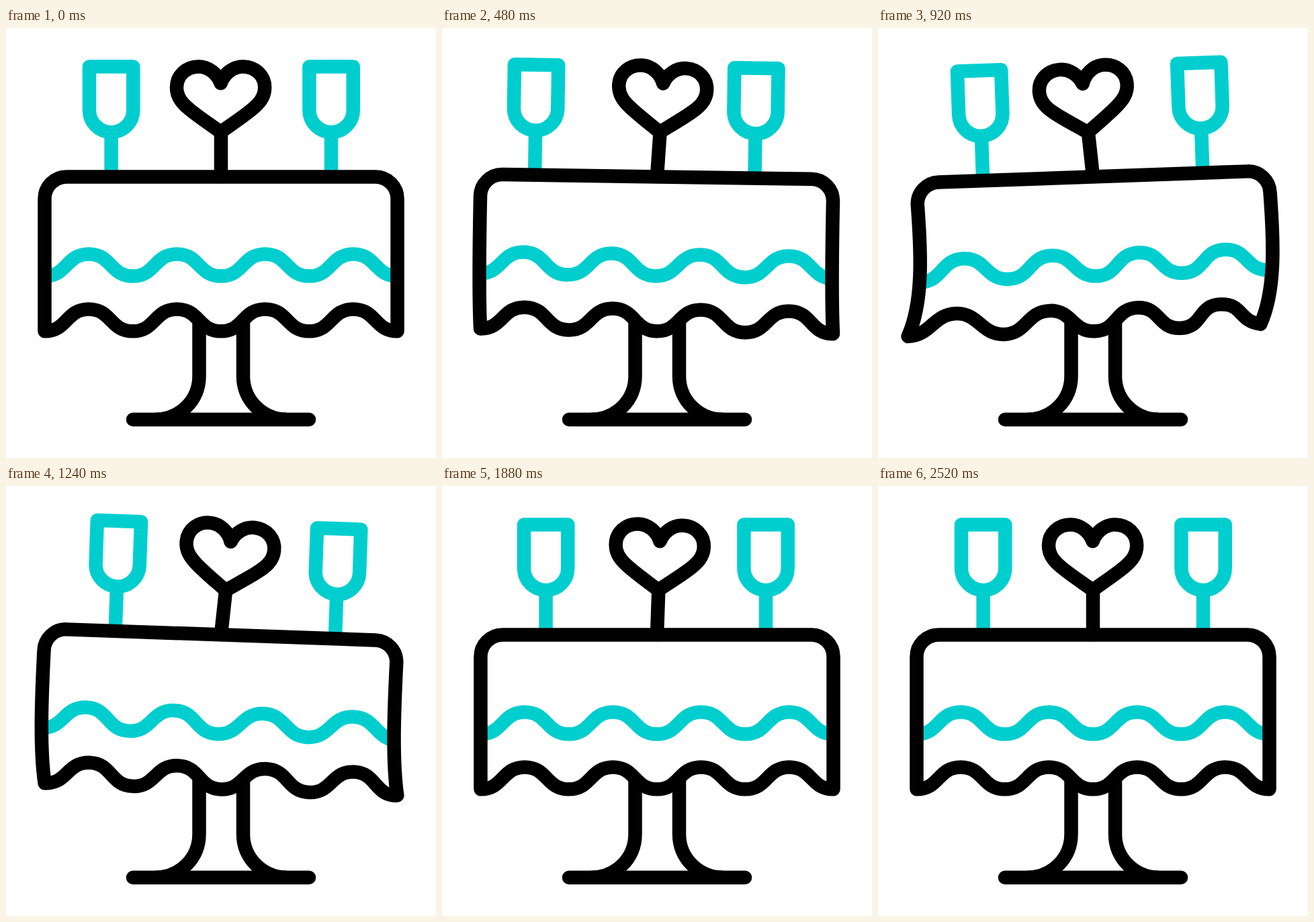
Write an HTML page that moves like this. It is 640 px wide and 640 px high and loops after 2.72 s.

```html
<!DOCTYPE html>
<html lang="en">
<head>
<meta charset="utf-8">
<title>Swaying table</title>
<style>
  html, body { margin: 0; width: 100%; height: 100%; overflow: hidden; background: #fff; }
  svg { display: block; width: 100vw; height: 100vh; }
  path { fill: none; stroke: #000; stroke-width: 20.5; stroke-linejoin: round; }
  .teal { stroke: #00cece; }
  .cap { stroke-linecap: round; }
</style>
</head>
<body>
<svg viewBox="0 0 640 640">
  <path class="cap" d="M189 582.7H451"/>
  <path d="M287.5 436V518C287.5 554 259 582.7 222 582.7M353 436V518C353 554 382 582.7 418 582.7"/>
  <g id="table">
    <path class="teal" id="trim"/>
    <g id="glasses">
      <path class="teal" id="glass" d="M124 57.5H189.3V122.5A32.65 32.65 0 0 1 124 122.5ZM156.6 157V218"/>
      <use href="#glass" x="327.4"/>
    </g>
    <path id="cloth"/>
  </g>
  <g id="heart">
    <path class="cap" id="half" d="M319.5 82C314.5 68 301.5 57.5 286.5 57.5C268 57.5 254 71 254 88.5C254 104 264 113.5 273 121C288 133.5 309 147 319.5 155"/>
    <use href="#half" transform="translate(639.2 0) scale(-1 1)"/>
    <path class="cap" d="M320 155V221"/>
  </g>
</svg>
<script>
const LOOP = 2720, STEP = 40, END = 2520;
const LEFT = 57.5, RIGHT = 582.5, TOP = 221.4;
const el = id => document.getElementById(id);

// Each swing turns on the beat: 280 ms, then every 320 ms
const swing = (...values) => [[0, 0], ...values.map((v, i) => [280 + 320 * i, v])];

const tilt = swing(-3.5, 2.85, -2, 2, -1, 0);
const sway = swing(-10, 10.4, -6.2, 6.2, -3.1, 2, -1.1, 0);
const drag = swing(-1, 1, -1, 1, -0.75, 0);
const slide = [[0, 0], [480, -18.5], [920, -0.5], [1240, 6], [1560, 0], [1880, -2], [2200, 0]];

// Smooth curve through the keys, flat at every turning point
function sample(keys, t) {
  const last = keys.length - 1;
  if (t >= keys[last][0]) return keys[last][1];
  const i = keys.findIndex(k => k[0] > t) - 1;
  const rate = j => (keys[j + 1][1] - keys[j][1]) / (keys[j + 1][0] - keys[j][0]);
  const slope = j => {
    if (j === 0 || j === last) return 0;
    const a = rate(j - 1), b = rate(j);
    return a * b > 0 ? 2 * a * b / (a + b) : 0;
  };
  const [t0, v0] = keys[i], [t1, v1] = keys[i + 1];
  const d = t1 - t0, u = (t - t0) / d;
  return v0 + (v1 - v0) * u * u * (3 - 2 * u)
    + d * u * (1 - u) * ((1 - u) * slope(i) - u * slope(i + 1));
}

// Nine alternating troughs and crests; u runs from -1 to 1 across the cloth
function wavePoints(trough, offset) {
  return Array.from({ length: 9 }, (_, i) => {
    const u = i / 4 - 1, [dx, dy] = offset(u);
    return [320 + (RIGHT - 320) * u + dx, trough - (i % 2) * 32.8 + dy];
  });
}

function waveCurve(pts, endDip = 0) {
  const H = 34;
  let d = "M" + pts[0];
  for (let i = 1; i < pts.length; i++) {
    const [x0, y0] = pts[i - 1], [x1, y1] = pts[i];
    const dip = i === pts.length - 1 ? endDip : 0;
    d += `C${x0 + H} ${y0} ${x1 - H} ${y1 + dip} ${x1} ${y1}`;
  }
  return d;
}

function draw(t) {
  // The cloth trails the table; swinging left also flares its ends
  const pull = sample(drag, t), flare = Math.min(pull, 0);
  const trim = wavePoints(369.3, u => [6 * pull * Math.max(u, 0), 0]);
  const hem = wavePoints(451.3, u => [8 * pull + flare * (16 * u * u - 3), 2 * flare * u ** 4]);
  const endShift = hem[8][0] - RIGHT;
  const bulgeL = LEFT - 0.15 * (hem[0][0] - LEFT);
  const bulgeR = RIGHT - 0.15 * endShift;

  el("trim").setAttribute("d", waveCurve(trim));
  el("cloth").setAttribute("d", waveCurve(hem, 0.3 * endShift)
    + `C${bulgeR} 400 ${bulgeR} 330 ${RIGHT} 254`
    + `C${RIGHT} 236 568 ${TOP} 550 ${TOP}H90C72 ${TOP} ${LEFT} 236 ${LEFT} 254`
    + `C${bulgeL} 330 ${bulgeL} 400 ${hem[0]}Z`);

  el("table").setAttribute("transform", `rotate(${sample(tilt, t)} 320 221)`);
  el("heart").setAttribute("transform", `rotate(${sample(sway, t)} 320 221)`);
  el("glasses").setAttribute("transform", `translate(${sample(slide, t)} 0)`);
}

const start = performance.now();
function tick() {
  const t = (performance.now() - start) % LOOP;
  draw(Math.min(END, Math.floor(t / STEP) * STEP));
  requestAnimationFrame(tick);
}
tick();
</script>
</body>
</html>
```
